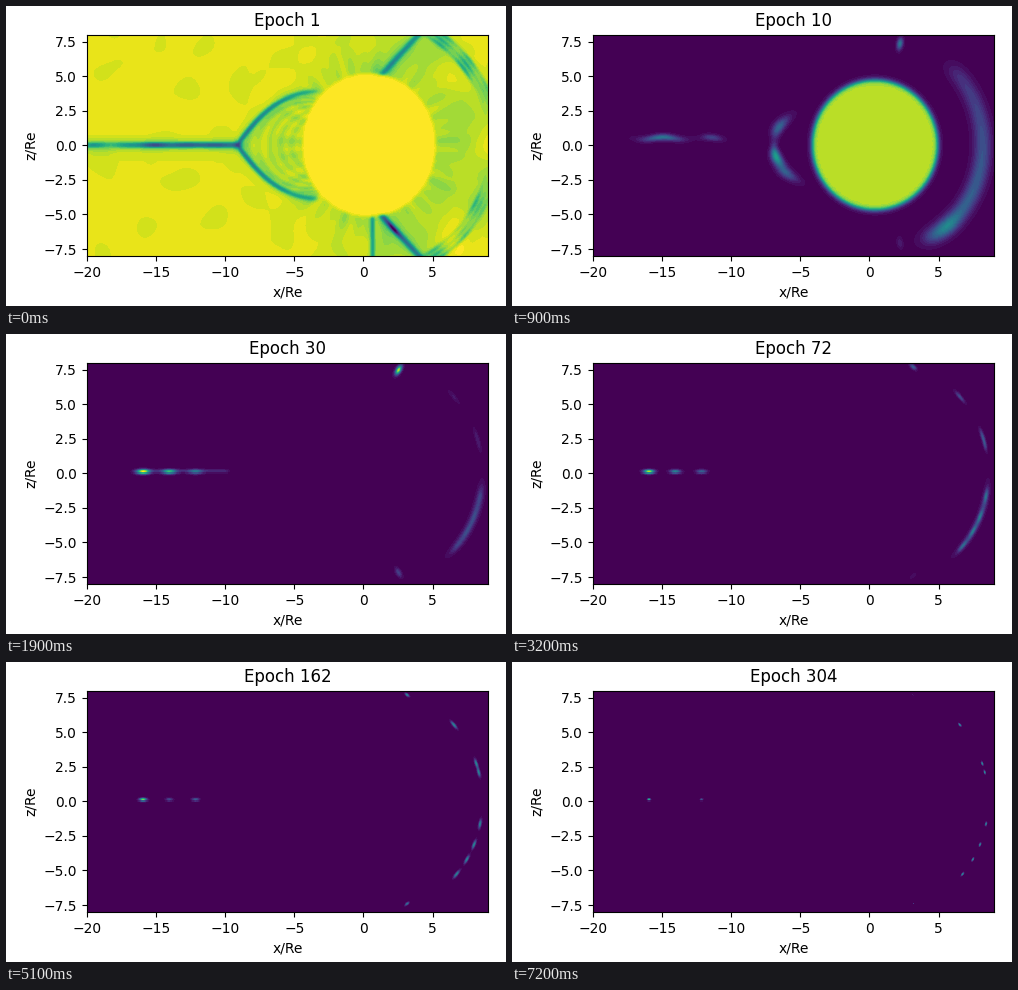
Write a matplotlib script that moves like this. It is 500 by 300 pixels and loops after 7.3 s.

```python
import numpy as np
import matplotlib.pyplot as plt
from matplotlib.animation import FuncAnimation

W, H, FRAMES, STEP_MS = 500, 300, 73, 100
LEVELS = 29
NX, NY = 401, 221

xs = -20 + 29 * (np.arange(NX) + 0.5) / NX
zs = 8 - 16 * (np.arange(NY) + 0.5) / NY
X, Z = np.meshgrid(xs, zs)
R, THETA = np.hypot(X, Z), np.degrees(np.arctan2(Z, X))

# polar angles of the last spots left on the day-side rim
RIM_SPOTS = (68, 40, 18.2, 13.8, -10.9, -21.3, -29.3, -38, -67)


def sigmoid(v):
    return 1 / (1 + np.exp(-np.clip(v, -50, 50)))


def bump(v, centre, width):
    return np.exp(-((v - centre) / width)**2 / 2)


def window(v, low, high, soft):
    return sigmoid((v - low) / soft) * sigmoid((high - v) / soft)


def blob(x, z, angle, length, width):
    c, s = np.cos(np.radians(angle)), np.sin(np.radians(angle))
    along = (X - x) * c + (Z - z) * s
    across = (Z - z) * c - (X - x) * s
    return bump(along, 0, length) * bump(across, 0, width)


def disc(cx, rx, rz, soft):
    r = np.hypot((X - cx) / rx, Z / rz)
    return sigmoid((1 - r) * rx / soft)


def rim(theta):
    """Radius of the day-side boundary at a polar angle in degrees."""
    return 8.58 - 0.5 * (theta / 70)**4


def arc(low, high, width, offset=0.0):
    return bump(R - rim(THETA), offset, width) * window(THETA, low, high, 2.5)


def noise(seed, scale, waves=14):
    rng = np.random.default_rng(seed)
    total = np.zeros_like(X)
    for _ in range(waves):
        a, p = rng.uniform(0, 2 * np.pi, 2)
        f = rng.uniform(0.5, 1.6) * scale
        total += np.sin(f * (X * np.cos(a) + Z * np.sin(a)) + p)
    return total / np.sqrt(waves / 2)


def opening_field():
    d = np.hypot(X - 0.4, Z)
    ripple = noise(6, 2)
    right = sigmoid((X + 1.5) / 0.9)
    v = 0.966 - 0.014 * np.clip(noise(3, 1.6), 0, 2)
    v -= 0.02 * bump(Z, -0.6, 1) + 0.025 * sigmoid((8.5 - d + ripple) / 0.5)
    v -= right * (0.045 * sigmoid((9.5 - d) / 0.4) - 0.02 * noise(8, 1.3))

    # short rays around the planet
    rays = np.sin(np.radians(23 * THETA)) + np.sin(np.radians(37 * THETA))
    v -= 0.02 * (1 + rays) * bump(d, 5.4, 0.9)

    tail = sigmoid(-(X + 9) / 0.2)
    depth = 0.15 + 0.3 * sigmoid((X + 16.3) / 0.5) + 0.06 * ripple
    v -= tail * (depth * bump(Z, 0, 0.11) + 0.15 * bump(Z, 0, 0.28))

    # night side: two bent arms and closed shells between them
    u = np.clip(-(X + 3.2) / 5.9, 0, 1)
    slope = 1.44 * u**1.2
    off = (np.abs(Z) - 3.85 * (1 - u**2.2)) / np.hypot(1, slope)
    arms = window(X, -9.2, -3.4, 0.12)
    v -= arms * ((0.18 + 0.26 * u) * bump(off, 0, 0.13)
                 + 0.09 * bump(off, -0.2, 0.4))
    shell = d**3 / np.maximum((X - 0.4)**2, 0.1)
    inside = sigmoid((9 - shell) / 0.3) * sigmoid(-(X + 2.5) / 0.4)
    v -= 0.025 * inside * (1 + np.cos(2 * np.pi * shell / 0.8))

    # day side: thin outer strands, two cusps and a short spike
    for k, radius in enumerate((9.1, 9.45, 9.8)):
        away = window(np.abs(THETA), 19 + 2 * k, 63, 3)
        v -= away * (0.17 + 0.06 * ripple) * bump(R, radius, 0.12)
    side = np.where(Z < 0, 0.42, 0.3)
    cusp = (X - 1.35 - 0.92 * (np.abs(Z) - 5.1)) / 1.36
    v -= side * bump(cusp, 0, 0.15) + 0.1 * bump(cusp, 0, 0.4)
    v -= 0.4 * blob(2.15, -6.05, -48, 0.45, 0.13)
    v -= 0.3 * bump(X, 0.65, 0.12) * sigmoid(-(Z + 5) / 0.1)

    planet = disc(0.39, 4.85, 5.17, 0.06)
    return v * (1 - planet) + planet


def glow_field():
    """Tail streak, night-side hook and day-side crescent at their brightest."""
    streak = 0.58 * bump(X, -15, 0.95) + 0.3 * bump(X, -11.4, 0.5)
    v = streak * bump(Z, 0.45 + 0.08 * np.sin(2 * X), 0.16)
    hook = (0.85 * bump(Z, -0.8, 0.5) + 0.5 * bump(Z, 1.25, 0.5)
            + 0.4 * bump(Z, -2, 0.4))
    v += hook * bump(X, 0.22 * Z**2 - 6.9, 0.18 + 0.09 * np.abs(Z))
    shade = np.interp(THETA, [-45, 0, 45], [0.5, 0.38, 0.18])
    shade += 0.22 * bump(THETA, -46, 5)
    return v + shade * arc(-58, 43, 0.42, -0.4)


OPENING = opening_field()
GLOW = glow_field()
SPECKS = (0.08 * blob(-17.5, 7.65, 0, 0.9, 0.4)
          + 0.06 * blob(-9.7, -7.2, -25, 0.7, 0.3))
STRIPES = 0.018 * np.sin(Z * 19)


def planet_field(n):
    level = np.interp(n, [2, 12, 15, 18], [0.935, 0.885, 0.6, 0])
    grow = np.interp(n, [2, 12], [0, 1])
    shape = disc(0.46 - 0.1 * grow, 4.35 + 0.28 * grow, 4.6 + 0.1 * grow, 0.1)
    return shape * (level + STRIPES * (1 - grow))


def cusp_spots(n):
    """A bright spot at the top edge and a faint one at the bottom."""
    keys = (3, 12, 19, 32, 51)
    size = 0.33 - 0.0042 * n
    top = np.interp(n, keys, [0, 0.6, 0.9, 0.3, 0.5])
    low = np.interp(n, keys, [0, 0.12, 0.2, 0.05, 0.4])
    x = np.interp(n, [12, 32], [2.2, 3.15])
    z = np.interp(n, [12, 32], [7.3, 7.65])
    turn = np.interp(n, [12, 19, 32], [80, 60, -40])
    return (top * blob(x, z, turn, size, size / 2)
            + low * blob(x, -z + 0.25, -turn, size, size / 2))


def late_field(n):
    """Dots on the tail and rim that shrink along a straight line in time."""
    length, width = 2.6 - 0.03 * n, 2.2 - 0.02 * n
    tail = (0.95 - 0.003 * (n - 19), 0.6 - 0.0113 * (n - 19), 0.32)
    v = np.zeros_like(X)
    for i, s in enumerate(tail):
        v += s * blob(1.9 * i - 15.95, 0.09, 0, 0.16 * length, 0.055 * width)
    for theta in RIM_SPOTS[1:-1]:
        a = np.radians(theta)
        r = rim(theta)
        s = np.interp(n, [19, 51, 72], [0.06, 0.47, 0.55])
        v += s * blob(r * np.cos(a), r * np.sin(a), theta + 90,
                      0.2 * length, 0.055 * width)
    if n < 51:
        s = np.interp(n, [19, 32, 51], [0.19, 0.2, 0])
        v += s * arc(-40, -8, 0.2 - 0.003 * (n - 15))
        s = np.interp(n, [19, 30], [0.12, 0])
        v += s * bump(Z, 0.12, 0.08) * window(X, -16, -9.8, 0.1)
    return v * np.interp(n, [13, 19], [0, 1])


def field(n):
    if n == 0:
        return OPENING
    v = SPECKS * np.interp(n, [2, 6], [1, 0])
    v = v + GLOW * np.interp(n, [3, 12, 18], [0, 1, 0]) + cusp_spots(n)
    if n < 18:
        v = np.maximum(v, planet_field(n))
    if n > 13:
        v = v + late_field(n)
    return v


def epoch(n):
    """The step between shown epochs grows by one every ten frames."""
    tens, ones = divmod(n + 1, 10)
    return 5 * tens * (tens + 1) + ones * (tens + 1)


def banded(v):
    return np.round(np.clip(v, 0, 1) * LEVELS) / LEVELS


fig = plt.figure(figsize=(W / 100, H / 100), dpi=100, facecolor="white")
ax = fig.add_axes([80.9 / W, 50.03 / H, 401 / W, 221.24 / H])
image = ax.imshow(banded(OPENING), extent=(-20, 9, -8, 8), cmap="viridis",
                  vmin=0, vmax=1, interpolation="nearest", aspect="auto")
ax.set_xticks(np.arange(-20, 6, 5))
ax.set_yticks(np.arange(-7.5, 8, 2.5))
ax.set_xlabel("x/Re")
ax.set_ylabel("z/Re")
title = ax.set_title("Epoch 1")


def draw(n):
    image.set_data(banded(field(n)))
    title.set_text(f"Epoch {epoch(n)}")
    return image, title


ani = FuncAnimation(fig, draw, frames=FRAMES, interval=STEP_MS, repeat=True,
                    repeat_delay=0)
plt.show()
```
